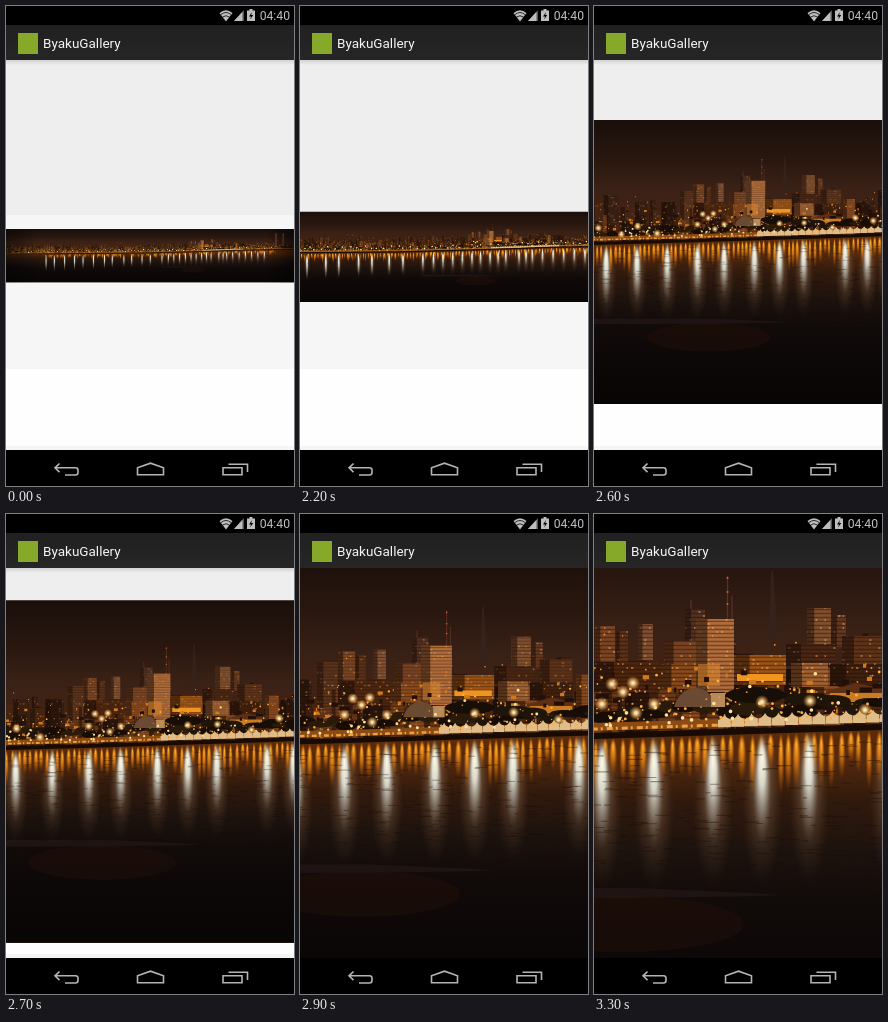
These frames come from a looping animation (288 by 480 pixels, 6300 ms). An HTML page:

```html
<!DOCTYPE html>
<html lang="en">
<head>
<meta charset="utf-8">
<title>ByakuGallery</title>
<style>
html, body { margin: 0; width: 100%; height: 100%; overflow: hidden; background: #000; }
svg { display: block; width: 100vw; height: 100vh; }
text { font-family: Roboto, "Noto Sans", sans-serif; }
</style>
</head>
<body>
<svg viewBox="0 0 288 480" xmlns="http://www.w3.org/2000/svg">
  <defs>
    <clipPath id="view"><rect y="54" width="288" height="390"/></clipPath>
    <clipPath id="frame"><rect x="-1907.4" y="-13.6" width="2980.8" height="553.7"/></clipPath>
    <linearGradient id="bar" x2="0" y2="1">
      <stop stop-color="#202020"/><stop offset="1" stop-color="#262626"/>
    </linearGradient>
    <linearGradient id="shade" x2="0" y2="1">
      <stop stop-color="#000" stop-opacity=".12"/><stop offset="1" stop-color="#000" stop-opacity="0"/>
    </linearGradient>
    <linearGradient id="sky" gradientUnits="userSpaceOnUse" x1="0" y1="-14" x2="0" y2="200">
      <stop stop-color="#1a0f0a"/><stop offset=".35" stop-color="#28170f"/>
      <stop offset=".62" stop-color="#3a2116"/><stop offset="1" stop-color="#472410"/>
    </linearGradient>
    <linearGradient id="water" gradientUnits="userSpaceOnUse" x1="0" y1="205" x2="0" y2="540">
      <stop stop-color="#5e2c08"/><stop offset=".12" stop-color="#54290c"/>
      <stop offset=".24" stop-color="#311a0d"/><stop offset=".4" stop-color="#1c120d"/>
      <stop offset=".56" stop-color="#100a09"/><stop offset="1" stop-color="#080505"/>
    </linearGradient>
    <radialGradient id="gold" fy=".2">
      <stop stop-color="#ffb830"/><stop offset=".45" stop-color="#e07c10" stop-opacity=".8"/>
      <stop offset="1" stop-color="#8a3f08" stop-opacity="0"/>
    </radialGradient>
    <radialGradient id="haze" fy=".25">
      <stop stop-color="#c8b498" stop-opacity=".6"/><stop offset=".5" stop-color="#8a6c50" stop-opacity=".35"/>
      <stop offset="1" stop-color="#583c28" stop-opacity="0"/>
    </radialGradient>
    <radialGradient id="pale" fy=".2">
      <stop stop-color="#fffbe8"/><stop offset=".35" stop-color="#e2e4d8" stop-opacity=".9"/>
      <stop offset=".65" stop-color="#a8a69c" stop-opacity=".5"/><stop offset="1" stop-color="#605448" stop-opacity="0"/>
    </radialGradient>
    <radialGradient id="glow">
      <stop stop-color="#fffbe8"/><stop offset=".25" stop-color="#ffe0a0" stop-opacity=".9"/>
      <stop offset="1" stop-color="#ff9a30" stop-opacity="0"/>
    </radialGradient>
    <linearGradient id="edges">
      <stop stop-color="#000" stop-opacity=".45"/><stop offset=".12" stop-color="#000" stop-opacity="0"/>
      <stop offset=".9" stop-color="#000" stop-opacity="0"/><stop offset="1" stop-color="#000" stop-opacity=".6"/>
    </linearGradient>
    <pattern id="windows" width="45" height="36" patternUnits="userSpaceOnUse">
      <path id="floors" stroke="#180a04" stroke-opacity=".4" stroke-width="1.3"/>
      <path id="lit" stroke="#ffb860" stroke-opacity=".6" stroke-width="1.5"/>
    </pattern>
  </defs>

  <rect width="288" height="480"/>
  <rect y="54" width="288" height="155" fill="#eee"/>
  <rect y="209" width="288" height="154" fill="#f6f6f6"/>
  <rect y="363" width="288" height="81" fill="#fefefe"/>
  <rect y="440" width="288" height="4" fill="#f5f5f5"/>
  <rect y="54" width="288" height="5" fill="url(#shade)"/>

  <g clip-path="url(#view)"><g id="photo"><g id="scene" clip-path="url(#frame)"></g></g></g>

  <rect y="19" width="288" height="35" fill="url(#bar)"/>
  <rect x="12" y="27" width="20" height="21" fill="#86a92a"/>
  <text x="37" y="42" font-size="13.5" fill="#f4f4f4">ByakuGallery</text>

  <g fill="#bebebe">
    <path d="M213.500 7Q220 1.500 226.500 7L220 15.500Z"/>
    <path d="M215 8.500Q220 4.500 225 8.500M216.500 11Q220 8.500 223.500 11" fill="none" stroke="#000" stroke-width=".8"/>
    <path d="M238 4V15H228Z" fill="#555"/>
    <path d="M236.500 5.700V15H228Z"/>
    <path d="M243.500 3h3v1.500h2.500V15h-8V4.500h2.500Z"/>
    <path d="M246 6l-3 4.500h2l-.8 3 3-4.500h-2Z" fill="#000"/>
    <text x="284" y="14" font-size="12.2" text-anchor="end">04:40</text>
  </g>
  <g fill="none" stroke="#b4b4b4" stroke-width="1.6">
    <path d="M53.500 457.500L49 461.800l4.500 4.300M49 461.800H69.500Q72 461.800 72 464.300V466.500Q72 469 69.500 469H59"/>
    <path d="M131.500 468.700V461.800L144.500 457.200 157.500 461.800V468.700Z"/>
    <path d="M217 461.800H236V468.800H217ZM222.500 458.200H241.500V466"/>
  </g>
</svg>
<script>
const NS = 'http://www.w3.org/2000/svg';
const byId = id => document.getElementById(id);
const scene = byId('scene'), photo = byId('photo');
const LEFT = -1907, RIGHT = 1073, TOP = -14, BOTTOM = 540;

let seed = 20;
function rnd(a = 0, b = 1) {
  seed = (seed + 0x6D2B79F5) | 0;
  let t = Math.imul(seed ^ (seed >>> 15), 1 | seed);
  t = (t + Math.imul(t ^ (t >>> 7), 61 | t)) ^ t;
  return a + (b - a) * ((t ^ (t >>> 14)) >>> 0) / 4294967296;
}
const pick = list => list[Math.floor(rnd(0, list.length))];

function add(tag, attrs) {
  const el = document.createElementNS(NS, tag);
  for (const k in attrs) el.setAttribute(k, attrs[k]);
  scene.append(el);
}
const box = (x, y, width, height, fill) => add('rect', { x, y, width, height, fill });
const shape = (d, fill, more) => add('path', { d, fill, ...more });
const blob = (cx, cy, rx, ry, fill) => add('ellipse', { cx, cy, rx, ry, fill });

const quay = [[LEFT, 246], [-454, 234], [0, 222], [288, 213], [475, 206], [RIGHT, 196]];
function shore(x) {
  let i = 1;
  while (i < quay.length - 1 && x > quay[i][0]) i++;
  const [x0, y0] = quay[i - 1], [x1, y1] = quay[i];
  return y0 + (y1 - y0) * (x - x0) / (x1 - x0);
}
const shoreLine = dy => quay.map(([x, y]) => `${x} ${y + dy}`).join('L');

function drawWindows() {
  let floors = '', lit = '';
  for (let y = 2; y < 36; y += 4) {
    floors += `M0 ${y + 1.5}h45`;
    for (let x = 1; x < 44; x += 4.5)
      if (rnd() < 0.22) lit += `M${x} ${y}h${rnd(1.2, 2.6)}`;
  }
  byId('floors').setAttribute('d', floors);
  byId('lit').setAttribute('d', lit);
}

// A lit front with a shaded side wall.
function house(x, y, w, h, fill) {
  box(x, y, w, h, fill);
  box(x, y, w, h, 'url(#windows)');
  box(x, y, w * 0.3, h, '#1a0c0688');
}

function skyline(low, high, colors) {
  for (let x = LEFT; x < RIGHT;) {
    const w = rnd(9, 30), far = x > 560 ? 0.6 : 1, h = rnd(low, high) * far;
    house(x, shore(x) - h, w, h, pick(colors));
    x += w + rnd(-6, 8);
  }
}

// Marks of one colour share a single path.
function marks(n, color, thick, long, above, below) {
  let d = '';
  for (let i = 0; i < n; i++) {
    const x = rnd(-1850, 960), lift = below + (above - below) * rnd() * rnd();
    d += `M${x.toFixed(1)} ${(shore(x) - lift).toFixed(1)}h${rnd(0.01, long).toFixed(2)}`;
  }
  shape(d, 'none', { stroke: color, 'stroke-width': thick, 'stroke-linecap': long > 1 ? 'butt' : 'round' });
}

function drawCity() {
  box(LEFT, TOP, RIGHT - LEFT, BOTTOM - TOP, 'url(#sky)');
  skyline(50, 98, ['#3a1d10', '#4a2713', '#3b2013', '#5a331c']);
  skyline(32, 78, ['#6b3818', '#4b2712', '#8a4a1e', '#2a150b', '#2a150b']);

  shape('M174 125L177.500 57H179L184 125Z', '#35231b');
  shape('M133.500 62V106M138 82V106M97 86V96', 'none', { stroke: '#5a3222', 'stroke-width': 1.2 });
  for (const y of [64, 78, 90]) blob(133.5, y, 1, 1, '#e05a38');
  const landmarks = [
    [0, 112, 21, 40, '#7a4522'], [22, 117, 12, 38, '#5a3018'], [44, 110, 15, 36, '#805032'],
    [91, 95, 20, 38, '#503020'], [70, 127, 32, 24, '#7a4423'], [0, 148, 66, 30, '#4c260f'],
    [66, 150, 38, 25, '#8a4a1c'], [102, 105, 38, 73, '#b06c3a'], [140, 141, 52, 30, '#9c5416'],
    [213, 94, 24, 37, '#80502e'], [239, 101, 13, 32, '#623820'], [192, 130, 50, 22, '#4a2613'],
    [197, 149, 37, 24, '#a06232'], [248, 122, 40, 28, '#5e3319'], [236, 150, 52, 22, '#40200e']
  ];
  for (const b of landmarks) house(...b);
  box(104, 150, 22, 22, '#e08a2c88');
  box(143, 160, 46, 7, '#f09420');
  box(236, 176, 52, 12, '#cc7c20');
  shape('M232 177L262 169 292 175V179H232Z', '#5e2f15');

  // Chimneys at the right end.
  for (const x of [880, 955]) box(x, 30, 14, 165, '#7a4a30');

  marks(330, '#d07a1c', 4, 9, 95, 16);
  marks(200, '#221008', 5, 14, 80, 14);

  // Trees and the lit waterfront.
  for (let x = LEFT; x < RIGHT; x += rnd(12, 26))
    blob(x, shore(x) - rnd(15, 28), rnd(9, 20), rnd(4, 8), pick(['#170d06', '#20150a', '#2a1a0a']));
  blob(162, 181, 30, 8, '#170e08');
  blob(215, 185, 25, 6, '#1d140a');
  shape('M80 193Q86 174 103 174Q117 175 122 193Z', '#6a4a32');
  box(117, 179, 14, 14, '#b88a58');
  shape(`M${shoreLine(-9)}`, 'none', { stroke: '#8a4c14', 'stroke-width': 8 });
  shape(`M${shoreLine(-7)}`, 'none', { stroke: '#f0a03c', 'stroke-width': 3, 'stroke-dasharray': '6 3 2 4' });

  let tents = '';
  for (let x = 124; x < 540; x += 13.5) {
    const y = shore(x);
    tents += `M${x} ${y - 5}V${y - 12}Q${x + 5} ${y - 14} ${x + 6.500} ${y - 18}Q${x + 8} ${y - 14} ${x + 12.800} ${y - 13}V${y - 5}Z`;
  }
  shape(tents, '#e0bd88');

  marks(700, '#f0983a', 1.8, 0.1, 110, 14);
  marks(420, '#ffb040', 2.8, 0.1, 80, 10);
  marks(200, '#ffe0a0', 3.6, 0.1, 60, 10);
  for (let x = -1700; x < 900; x += rnd(18, 50))
    if (x < -30 || x > 288) blob(x, shore(x) - rnd(14, 40), 8, 8, 'url(#glow)');
  const lamps = [[8, 190], [18, 170], [29, 178], [39, 169], [60, 190], [168, 188], [216, 187], [42, 199], [271, 196]];
  for (const [x, y] of lamps) blob(x, y, 7, 7, 'url(#glow)');
}

function drawWater() {
  shape(`M${shoreLine(0)}V${BOTTOM}H${LEFT}Z`, 'url(#water)');
  blob(30, 410, 120, 28, '#2a120866');

  const streaks = [-415, -293, -228, -170, -110, -51, 8, 60, 119, 168, 215, 296, 339, 378];
  for (let x = -1493; x < -440; x += rnd(75, 130)) streaks.push(x);
  for (let x = 440; x < 800; x += 65) streaks.push(x);
  for (const x of streaks) blob(x, shore(x) + 75, 20, 80, 'url(#haze)');

  for (let x = -1500; x < 880; x += rnd(7, 11)) {
    const len = rnd(34, 66);
    blob(x, shore(x) + 2 + len / 2, rnd(3.4, 5), len / 2, 'url(#gold)');
  }
  for (const x of streaks) {
    const len = 112 + Math.max(0, -x) * 0.06;
    blob(x, shore(x) + 2 + len / 2, 9.5, len / 2, 'url(#pale)');
  }

  let ripples = '';
  for (let i = 0; i < 2600; i++) {
    const x = rnd(LEFT, RIGHT), y = shore(x) + rnd(12, 170);
    ripples += `M${x.toFixed(1)} ${y.toFixed(1)}h${rnd(4, 18).toFixed(1)}`;
  }
  shape(ripples, 'none', { stroke: '#1a0d06', 'stroke-width': 1.1, 'stroke-opacity': 0.4 });
  shape('M-300 374H40Q120 377 190 381Q100 385 -300 384Z', '#241818', { opacity: 0.7 });
  shape(`M${shoreLine(0)}`, 'none', { stroke: '#180b05', 'stroke-width': 6 });
  box(LEFT, TOP, RIGHT - LEFT, BOTTOM - TOP, 'url(#edges)');
}

drawWindows();
drawCity();
drawWater();

// Scene units equal screen pixels at full zoom.
const LOOP = 6300, START = 2000, STEP = 100, STEPS = 13;
const FULL = 10.35, PX = 204, PY = 248.3;
let shown;

function zoomAt(t) {
  if (t < START) return 1;
  const i = Math.min(STEPS, Math.floor((t - START) / STEP));
  const p = 0.025 + 0.075 * i;
  return 1 + (FULL - 1) * (1 - Math.cos(Math.PI * p)) / 2;
}

function render(t) {
  const zoom = zoomAt(t);
  if (zoom === shown) return;
  shown = zoom;
  photo.setAttribute('transform', `translate(${PX} ${PY}) scale(${zoom / FULL}) translate(${-PX} ${-PY})`);
}

const begin = performance.now();
function tick() {
  render((performance.now() - begin) % LOOP);
  requestAnimationFrame(tick);
}
tick();
</script>
</body>
</html>
```
